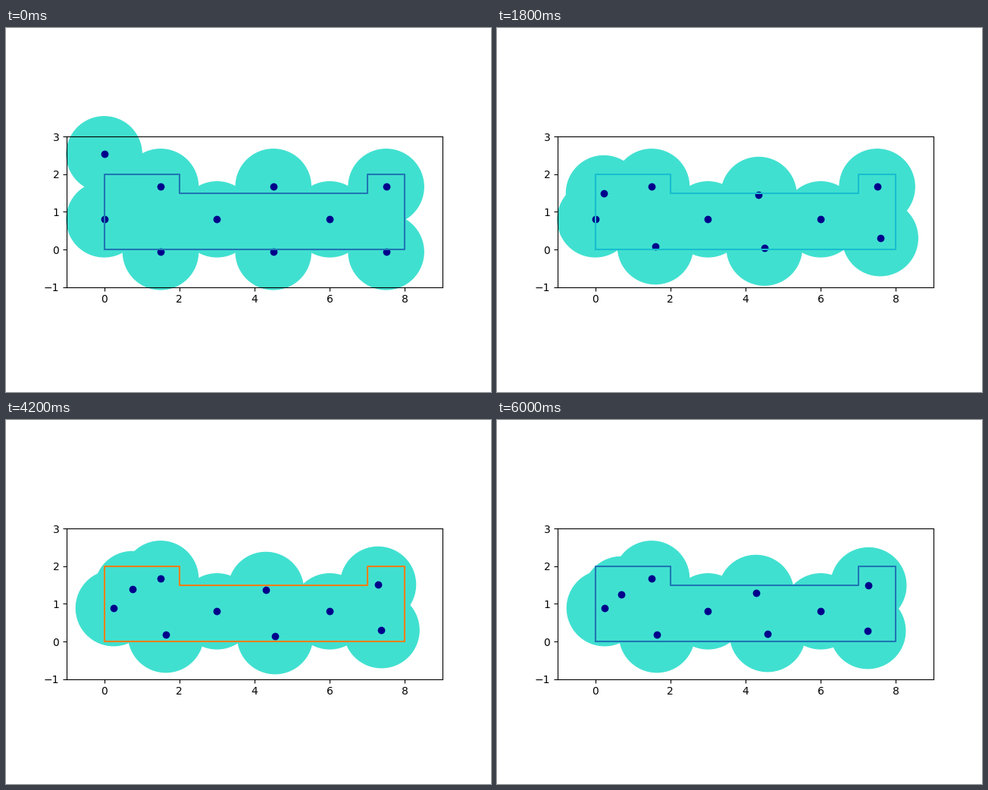
A matplotlib script for the animation above (6.2 s loop, 640x480 px).

```python
import matplotlib.pyplot as plt
import numpy as np
from matplotlib.animation import FuncAnimation

FRAMES, STEP_MS = 31, 200
RADIUS = 1.0
ROW = np.sqrt(3)  # vertical spacing of the hexagonal cover

# Starting lattice: columns 1.5 apart, every other one shifted by half a row
COLUMNS = [(0, (0, 1)), (1, (0.5, -0.5)), (2, (0,)), (3, (-0.5, 0.5)),
           (4, (0,)), (5, (0.5, -0.5))]
start = [(1.5 * c, 0.8 + ROW * r) for c, rows in COLUMNS for r in rows]

# disc: frame up to which it rests, then (frame, x, y) stops
MOVES = {
    0: (9, [(12, 0.25, 0.885)]),
    1: (0, [(2, -0.26, 2.0), (5, -0.02, 1.41), (9, 0.23, 1.49),
            (12, 0.435, 1.49), (13, 0.59, 1.49), (18, 0.75, 1.39),
            (21, 0.75, 1.39), (24, 0.75, 1.25), (26, 0.75, 1.25),
            (30, 0.69, 1.25)]),
    3: (6, [(9, 1.6, 0.08), (13, 1.6, 0.08), (18, 1.64, 0.18)]),
    5: (6, [(9, 4.5, 0.048), (13, 4.5, 0.048), (18, 4.51, 0.07),
            (21, 4.545, 0.14), (24, 4.57, 0.17), (26, 4.585, 0.18),
            (30, 4.585, 0.2)]),
    6: (0, [(5, 4.35, 1.45), (16, 4.35, 1.45), (21, 4.3, 1.37),
            (26, 4.3, 1.33), (30, 4.275, 1.29)]),
    8: (9, [(12, 7.338, 1.55), (18, 7.338, 1.55), (21, 7.285, 1.512),
            (24, 7.285, 1.512), (26, 7.27, 1.49)]),
    9: (0, [(5, 7.568, 0.16), (9, 7.582, 0.3), (13, 7.582, 0.3),
            (18, 7.377, 0.3), (24, 7.377, 0.3), (26, 7.31, 0.28),
            (30, 7.25, 0.28)]),
}

OUTLINE = np.array([(0, 0), (8, 0), (8, 2), (7, 2), (7, 1.5),
                    (2, 1.5), (2, 2), (0, 2), (0, 0)])


def center(i, frame):
    if i not in MOVES:
        return start[i]
    rest, stops = MOVES[i]
    t, x, y = zip((rest, *start[i]), *stops)
    return np.interp(frame, t, x), np.interp(frame, t, y)


fig, ax = plt.subplots(figsize=(6.4, 4.8), dpi=100)
ax.set_aspect("equal")
ax.set_xlim(-1, 9)
ax.set_ylim(-1, 3)
ax.set_xticks(range(0, 9, 2))
ax.set_yticks(range(-1, 4))

discs = [ax.add_patch(plt.Circle(p, RADIUS, color="turquoise", clip_on=False))
         for p in start]
dots = ax.scatter(*zip(*start), color="darkblue", zorder=1.5)
wall, = ax.plot(*OUTLINE.T, color="C0")


def update(frame):
    points = [center(i, frame) for i in range(len(start))]
    for disc, p in zip(discs, points):
        disc.center = p
    dots.set_offsets(points)
    wall.set_color(f"C{frame % 10}")
    return [*discs, dots, wall]


anim = FuncAnimation(fig, update, frames=FRAMES, interval=STEP_MS,
                     repeat=True, repeat_delay=0, blit=False)
plt.show()
```
